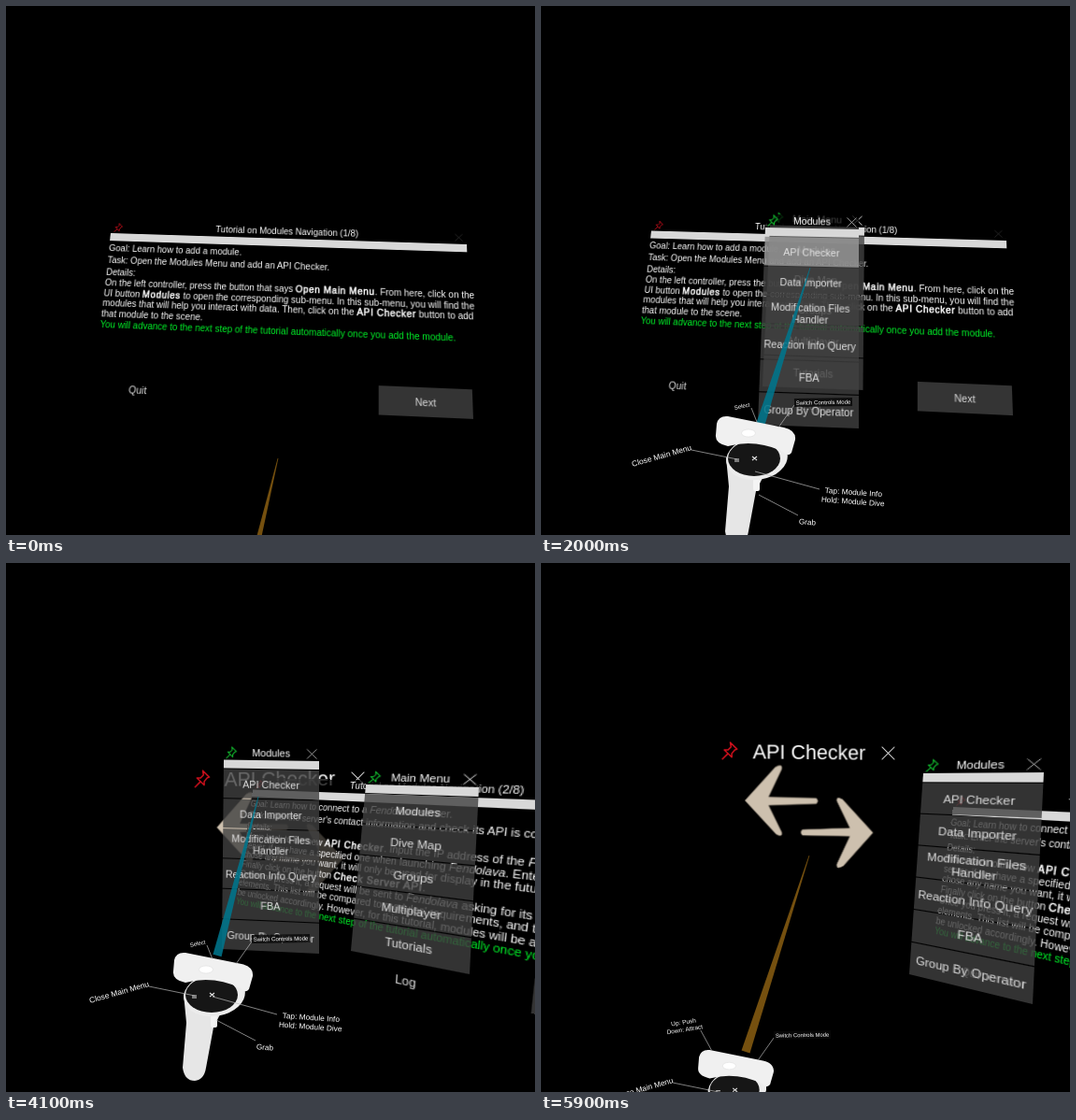
An HTML page that plays this animation: 566 px wide and 566 px high, repeating every 6 s.

```html
<!DOCTYPE html>
<html lang="en">
<head>
<meta charset="utf-8">
<title>Module tutorial</title>
<style>
html, body { margin: 0; width: 100%; height: 100%; overflow: hidden; background: #000; }
#stage { position: relative; width: 566px; height: 566px; overflow: hidden; background: #000;
  font-family: "Liberation Sans", Arial, sans-serif; color: #fff; }
.panel { position: absolute; left: 0; top: 0; transform-origin: 0 0; }
.panel > * { position: absolute; }
.bar { left: 0; top: 0; width: 100%; height: 9.3px; background: #d8d8d8; }
.head { left: 0; top: -15px; width: 100%; height: 15px; background: rgba(0,0,0,.75); }
.title { left: 0; width: 100%; top: -15px; line-height: 14px; text-align: center; white-space: nowrap; }
svg { overflow: visible; fill: none; }
#tut { width: 400px; height: 188px; font-size: 10px; }
#tut .back { inset: 9px 0 0; background: rgba(0,0,0,.72); }
#tut .text { left: 0; white-space: pre; line-height: 11.6px; }
#tut b { font-weight: 400; letter-spacing: .07em; -webkit-text-stroke: .5px currentColor; }
#tut em { font-style: normal; color: #00f228; }
.btn { width: 97px; height: 30px; line-height: 30px; top: 158px; text-align: center; font-size: 10.5px; color: #ddd; }
.menu { width: 100px; font-size: 10.6px; }
.row { left: 0; width: 100%; height: 30.6px; display: flex; align-items: center; justify-content: center;
  text-align: center; line-height: 12px; white-space: pre; color: #e2e2e2; background: rgba(64,64,64,.8); }
.row.hot { background: rgba(146,146,146,.88); }
.row.bare { background: none; }
#api { width: 169px; height: 125px; }
#api .title { top: -12px; line-height: 26px; font-size: 21.5px; }
#over { position: absolute; left: 0; top: 0; }
#over text { fill: #fff; text-anchor: middle; }
#over line { stroke: #bbb; stroke-width: .7; }
</style>
</head>
<body>
<div id="stage">
  <div class="panel" id="api"><div class="title">API Checker</div></div>
  <div class="panel" id="tut">
    <div class="back"></div><div class="head"></div><div class="bar"></div>
    <div class="title"></div>
    <div class="text" style="top:11.9px">Goal: Learn how to add a module.</div>
    <div class="text" style="top:26.2px"></div>
    <div class="text" style="top:40.2px">Details:</div>
    <div class="text" style="top:52.2px"></div>
    <div class="btn" style="left:0">Quit</div>
    <div class="btn" style="left:303px;background:#343434">Next</div>
  </div>
  <div class="panel menu" id="main"></div>
  <div class="panel menu" id="mods"></div>
  <svg id="over" width="566" height="566">
    <polygon id="beam"/>
    <g id="pad">
      <path fill="#e6e6e6" d="M-32 24L-29 55L-33 103Q-31 117-20 117Q-10 116-8 103L0 60L8 44Z"/>
      <rect x="-3" y="46" width="7" height="14" rx="2" fill="#f4f4f4"/>
      <ellipse cx="1" cy="25" rx="33" ry="23" fill="#ececec" transform="rotate(-8 1 25)"/>
      <ellipse cx="-2" cy="25" rx="28" ry="19" fill="#161616"/>
      <path fill="#f0f0f0" d="M-42-12Q-40-21-30-20L30-8Q43-5 42 5L38 19Q34 24 29 18Q0 4-30 12Q-44 9-43 0Z"/>
      <ellipse cx="-8" cy="-2" rx="7.5" ry="4" fill="#fff" stroke="#ddd" stroke-width=".6"/>
      <path stroke="#ddd" stroke-width="1.2" d="M-23 26h5M-23 28h5M-4 23l5 4M1 23l-5 4"/>
    </g>
    <g id="tags"></g>
  </svg>
</div>
<script>
const $ = id => document.getElementById(id);
const LOOP = 6000, STEP = 100;

// Piecewise linear track: { time: [values] }
function track(keys) {
  const times = Object.keys(keys).map(Number);
  return t => {
    let i = 0;
    while (i < times.length - 2 && t >= times[i + 1]) i++;
    const p = keys[times[i]], q = keys[times[i + 1]];
    const f = Math.min(1, Math.max(0, (t - times[i]) / (times[i + 1] - times[i])));
    return p.map((v, k) => v + (q[k] - v) * f);
  };
}

// Corner order: top left, top right, bottom right, bottom left
const quads = {
  tut: track({
    0: [112, 243, 493, 255, 500, 442, 91, 424],
    800: [122.5, 242, 503.5, 253.5, 511, 441, 102, 421],
    2000: [118, 240.5, 498, 251, 505, 438, 97, 419],
    2800: [266, 240, 745, 256, 722, 510, 242, 403],
    3400: [259, 246.5, 744, 264, 722, 525, 235, 409],
    4100: [264, 242.5, 749, 260, 727, 521, 240, 405],
    5000: [310, 233, 850, 279, 815, 540, 275, 400],
    5600: [430, 230, 1080, 260, 1045, 600, 403, 408],
    5900: [441, 261, 1109, 291, 1075, 640, 414, 441]
  }),
  main: track({
    0: [239, 238, 340, 240, 338, 415, 231, 411],
    800: [249, 236, 350, 238.5, 348, 413, 241, 409],
    2000: [245, 234.5, 346, 237, 344.5, 411, 237, 407],
    2800: [386, 234, 504, 237, 496, 434, 371, 411],
    3400: [381, 240, 500, 243, 492, 443, 365, 419],
    4100: [385, 237, 506, 240, 496, 440, 369, 415],
    5000: [445, 235, 589, 241, 556, 462, 414, 418],
    5900: [600, 236, 760, 245, 730, 500, 572, 440]
  }),
  mods: track({
    1500: [243, 237, 343, 239, 343, 452, 235, 448],
    2000: [240, 237, 340, 239, 340, 452, 232, 448],
    2800: [218, 176, 321, 178, 320, 385, 214, 381],
    3400: [230, 214.5, 332, 216, 332, 422, 227, 418],
    4100: [233, 210.5, 335, 212, 335, 418, 231, 413],
    5000: [288, 201, 393, 207, 379, 418, 272, 404],
    5600: [386, 193, 508, 193, 496, 430, 371, 402],
    5900: [409, 225, 538, 224, 526, 472, 394, 440]
  }),
  api: track({
    3600: [206, 234, 372, 234, 373, 357, 206, 357],
    4100: [210, 231, 376, 230, 377, 354, 210, 354],
    5000: [261, 216, 433, 226, 425, 350, 252, 340],
    5600: [207, 165, 377, 168, 376, 290, 206, 290],
    5900: [202, 201, 371, 203, 371, 326, 202, 326]
  })
};
// base x, y, tip x, y
const beamAt = track({
  0: [251, 650, 291, 484], 800: [198, 543, 285, 316], 1100: [186, 492, 284, 290],
  2000: [235, 447, 288, 280], 2800: [197, 410, 250, 232], 3400: [223, 420, 265, 256],
  4100: [226, 420, 270, 250], 4600: [189, 438, 262, 264], 5000: [213, 445, 277, 280],
  5400: [195, 466, 282, 285], 5900: [219, 523, 287, 313]
});
// x, y, scale x, scale y, label scale, lower label shift, "Select" x, y
const padAt = track({
  0: [245, 662, 1.1, .6, 1.2, 0, -7, -40],
  800: [184, 559, 1.15, .5, 1.25, 0, -7, -42],
  1100: [175, 505, 1.05, .8, 1.05, 8, -10, -36],
  2000: [230, 459, 1, 1, 1, 14, -15, -31],
  2800: [192, 425, 1, 1, 1, 4, -16, -30],
  3400: [219, 437, 1, 1, 1, 0, -17, -30],
  4100: [222, 437, 1, 1, 1, 2, -17, -30],
  4600: [180, 449, .98, .98, 1, -2, -14, -26],
  5000: [203, 459, .96, .96, .97, -6, -11, -22],
  5400: [182, 482, .95, .95, .97, -3, -11, -22],
  5900: [209, 540, .95, .95, .98, 0, -11, -22]
});

function place(el, q) {
  const [x0, y0, x1, y1, x2, y2, x3, y3] = q;
  const W = el.offsetWidth, H = el.offsetHeight;
  const ax = x1 - x2, ay = y1 - y2, bx = x3 - x2, by = y3 - y2;
  const sx = x0 - x1 + x2 - x3, sy = y0 - y1 + y2 - y3, den = ax * by - bx * ay;
  const g = (sx * by - bx * sy) / den, h = (ax * sy - sx * ay) / den;
  const m = [
    (x1 - x0 + g * x1) / W, (y1 - y0 + g * y1) / W, 0, g / W,
    (x3 - x0 + h * x3) / H, (y3 - y0 + h * y3) / H, 0, h / H,
    0, 0, 1, 0, x0, y0, 0, 1
  ];
  el.style.transform = `matrix3d(${m.map(v => v.toFixed(9))})`;
}

const icon = (cls, path, x, y, size, color, width) =>
  `<svg class="${cls}" viewBox="-12 -12 24 24" width="${size}" height="${size}"
    style="left:${x - size / 2}px;top:${y - size / 2}px"><path d="${path}"
    stroke="${color}" stroke-width="${width}" stroke-linejoin="round"/></svg>`;
const pin = (x, y, size, color) =>
  icon('pin', 'M0 -12L9 -3L6 -2L2 3L2 8L-8 -2L-3 -2L1 -6ZM-3 3L-11 11', x, y, size, color, 1.9);
const cross = (x, y, size, color) =>
  icon('cross', 'M-11 -11L11 11M11 -11L-11 11', x, y, size, color, 1.5);

function menu(el, title, names, bare) {
  el.style.height = 10.3 + 32 * names.length - 1.4 + 'px';
  const row = (name, i, cls = '') =>
    `<div class="row ${cls}" style="top:${10.3 + 32 * i}px">${name}</div>`;
  el.innerHTML = `<div class="head"></div><div class="bar"></div><div class="title">${title}</div>` +
    pin(8, -8, 13, '#12b82e') + cross(92, -8, 11, '#ddd') +
    names.map((n, i) => row(n, i)).join('') + (bare ? row(bare, names.length, 'bare') : '');
}
menu($('main'), 'Main Menu', ['Modules', 'Dive Map', 'Groups', 'Multiplayer', 'Tutorials'], 'Log');
menu($('mods'), 'Modules', ['API Checker', 'Data Importer', 'Modification Files\nHandler',
  'Reaction Info Query', 'FBA', 'Group By Operator']);

$('tut').insertAdjacentHTML('beforeend', pin(8, -7, 11, '#d0101c') + cross(391, -8, 9, '#363636'));
const arrow = 'M16 53L48 17Q56 12 55 19L41 49L92 50Q95 53 92 56L41 58L55 87Q56 93 49 89Z';
$('api').insertAdjacentHTML('beforeend', pin(0, 0, 19, '#d0101c') + cross(169, 0, 15, '#ddd') +
  `<svg id="arrows" width="169" height="125" style="left:0;top:0" stroke="#7d7366" stroke-width=".6">
  <path d="${arrow}"/><path d="${arrow}" transform="rotate(180 84.5 70)"/></svg>`);

const advance = '<em>You will advance to the next step of the tutorial automatically once you add the module.</em>';
const pages = [
  ['Goal: Learn how to add a module.',
    'Task: Open the Modules Menu and add an API Checker.',
    `On the left controller, press the button that says <b>Open Main Menu</b>. From here, click on the
UI button <b>Modules</b> to open the corresponding sub-menu. In this sub-menu, you will find the
modules that will help you interact with data. Then, click on the <b>API Checker</b> button to add
that module to the scene.
${advance}`],
  ['Goal: Learn how to connect to a <i>Fendolava</i> server.',
    "Task: Enter the server's contact information and check its API is connected.",
    `Move back to the new <b>API Checker</b>. Input the IP address of the <i>Fendolava</i>
server, if you have a specified one when launching <i>Fendolava</i>. Enter or
chose any name you want, it will only be used for display in the future.
Finally click on the button <b>Check Server API</b>.
Once you press it, a request will be sent to <i>Fendolava</i> asking for its
elements. This list will be compared to modules' requirements, and they will
be unlocked accordingly. However, for this tutorial, modules will be all open.
${advance.replace('add the module', 'are connected')}`]
];
let page = -1;
function showPage(n) {
  if (n === page) return;
  page = n;
  const [goal, task, body] = $('tut').querySelectorAll('.text:not(:nth-of-type(7))');
  $('tut').querySelector('.title').textContent = `Tutorial on Modules Navigation (${n + 1}/8)`;
  [goal, task, body].forEach((el, i) => el.innerHTML = pages[n][i]);
}

// lines, x, y, turn, size, leader from and to (relative to the text)
const tags = [
  [['Select'], 0, 0, -12, 6.1, 10, 2, 16, 17],
  [['Switch Controls Mode'], 72, -35, -1, 6.05, -31, 3, -48, 27],
  [['Close Main Menu'], -101, 22, -16, 8.5, 32, -6, 81, 4],
  [['Tap: Module Info', 'Hold: Module Dive'], 104, 52, 4, 8.3, -105, -27, -36, -8],
  [['Grab'], 55, 79, 4, 8.2, -52, -29, -10, -7],
  [['Up: Push', 'Down: Attract'], -57, -45, -9, 6.7, 18, 5, 30, 27]
];
$('tags').innerHTML = tags.map(([lines, , , turn, size, x1, y1, x2, y2], i) => {
  const rows = lines.map((s, k) =>
    `<text y="${((k - (lines.length - 1) / 2) * 1.2 + .36) * size}" font-size="${size}">${s}</text>`);
  const plate = i === 1 ? '<rect x="-31" y="-4.5" width="62" height="9" fill="#0a0a0a" opacity=".85"/>' : '';
  return `<g><line x1="${x1}" y1="${y1}" x2="${x2}" y2="${y2}"/>
    <g transform="rotate(${turn})">${plate}${rows.join('')}</g></g>`;
}).join('');

const show = (el, on) => el.style.visibility = on ? 'visible' : 'hidden';
const within = (t, a, b) => t >= a && t < b;

function draw(t) {
  showPage(t < 3600 ? 0 : 1);
  for (const id in quads) place($(id), quads[id](t));
  show($('main'), t >= 500);
  show($('mods'), t >= 1500);
  show($('api'), t >= 3600);
  show($('main').querySelector('.cross'), t >= 1500);
  $('main').querySelector('.row').classList.toggle('hot', within(t, 1200, 1500));
  $('mods').querySelector('.row').classList.toggle('hot', within(t, 1700, 3600));
  $('arrows').style.fill = within(t, 4700, 5300) ? '#00d8b8' : '#cdc0ae';

  const [bx, by, tx, ty] = beamAt(t), len = Math.hypot(tx - bx, ty - by);
  const nx = -(ty - by) / len, ny = (tx - bx) / len;
  const pt = (x, y, w) => `${x + nx * w},${y + ny * w} ${x - nx * w},${y - ny * w}`;
  $('beam').setAttribute('points', pt(bx, by, 4.7) + ' ' + pt(tx, ty, -.4));
  $('beam').setAttribute('fill', within(t, 500, 4500) ? 'rgba(0,118,140,.88)' : '#75500f');

  const [cx, cy, sx, sy, k, low, selX, selY] = padAt(t);
  $('pad').setAttribute('transform', `translate(${cx} ${cy}) scale(${sx} ${sy})`);
  [...$('tags').children].forEach((el, i) => {
    const x = i ? tags[i][1] * k : selX;
    const y = i ? tags[i][2] + (i === 3 || i === 4 ? low : 0) : selY;
    el.setAttribute('transform', `translate(${cx + x} ${cy + y}) scale(${k})`);
  });
  show($('tags').children[0], t < 5300);
  show($('tags').children[5], t >= 4500);
}

const start = performance.now();
function tick(now) {
  const t = Math.max(0, now - start) % LOOP;
  draw(Math.floor(t / STEP) * STEP);
  requestAnimationFrame(tick);
}
draw(0);
requestAnimationFrame(tick);
</script>
</body>
</html>
```
